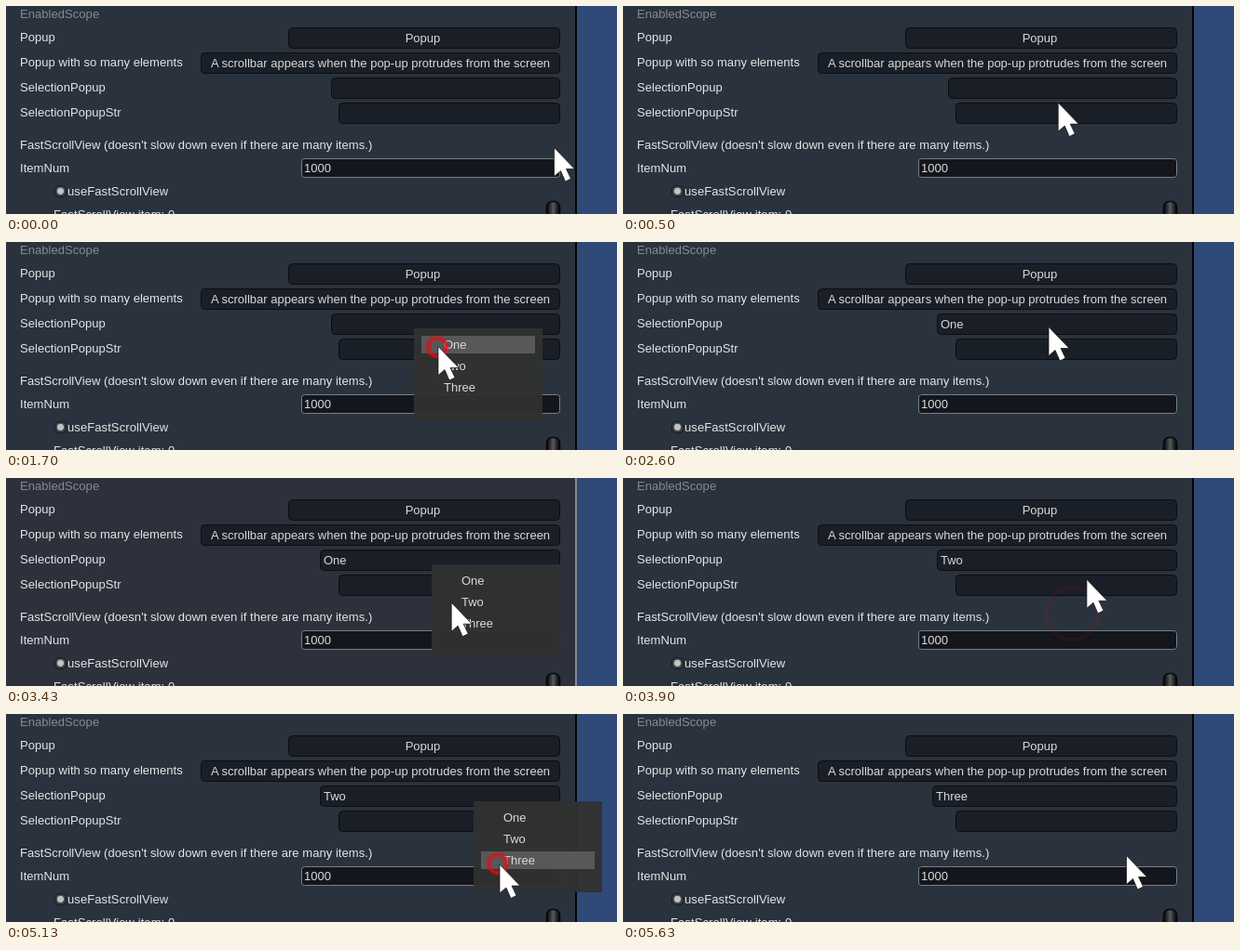
An HTML page that plays this animation: 656x224 px, repeating every 6530 ms.

```html
<!DOCTYPE html>
<html lang="en">
<head>
<meta charset="utf-8">
<title>Selection popup</title>
<style>
  html, body { margin: 0; width: 100%; height: 100%; overflow: hidden; background: #2a323d; }
  svg { display: block; width: 656px; height: 224px; }
  text { font: 13px "Liberation Sans", Arial, sans-serif; fill: #d8d9da; white-space: pre; }
  .labels text { fill: #e4e5e6; letter-spacing: .05px; }
  .labels .off { fill: #868a90; }
  .labels .toggle { letter-spacing: .09px; }
  .mid { text-anchor: middle; }
  .btn { fill: #1a1e27; stroke: #0b0d11; }
</style>
</head>
<body>
<svg viewBox="0 0 656 224">
  <defs>
    <linearGradient id="thumbFill">
      <stop offset=".1" stop-color="#111315"/>
      <stop offset=".5" stop-color="#55585c"/>
      <stop offset=".9" stop-color="#111315"/>
    </linearGradient>
    <filter id="soft" x="-50%" y="-50%" width="200%" height="200%">
      <feGaussianBlur stdDeviation=".8"/>
    </filter>
  </defs>
  <rect width="656" height="224" fill="#304a77"/>
  <rect id="panel" width="611" height="224"/>
  <rect id="edge" x="611" width="2" height="224"/>

  <g class="labels">
    <text class="off" x="15" y="13">EnabledScope</text>
    <text x="15" y="38">Popup</text>
    <text x="15" y="65">Popup with so many elements</text>
    <text x="15" y="92">SelectionPopup</text>
    <text x="15" y="119">SelectionPopupStr</text>
    <text x="15" y="154">FastScrollView (doesn't slow down even if there are many items.)</text>
    <text x="15" y="179">ItemNum</text>
    <text class="toggle" x="66" y="204">useFastScrollView</text>
    <text class="toggle" x="51" y="229">FastScrollView item: 0</text>
  </g>

  <rect class="btn" x="303.5" y="23.5" width="291" height="22" rx="4"/>
  <text class="mid" x="447.5" y="39">Popup</text>
  <rect class="btn" x="209.5" y="50.5" width="385" height="22" rx="4"/>
  <text class="mid" x="402" y="66">A scrollbar appears when the pop-up protrudes from the screen</text>
  <rect class="btn" id="choiceBox" y="77.5" height="22" rx="4"/>
  <text id="choiceText" y="93"></text>
  <rect class="btn" x="357.5" y="104.5" width="237" height="22" rx="4"/>

  <rect x="317.5" y="164.5" width="277" height="20" rx="3" fill="#13161c" stroke="#7b7e83"/>
  <text x="320" y="179">1000</text>

  <rect x="52.5" y="193.5" width="12" height="12" rx="4.5" fill="#3d4147" stroke="#14171b"/>
  <circle cx="58.5" cy="199.300" r="3.6" fill="#c0c1c3"/>
  <rect x="580.5" y="210.5" width="14" height="40" rx="6" fill="url(#thumbFill)" stroke="#060708" stroke-width="1.5"/>

  <g id="menu">
    <rect width="138" height="98" fill="#313131" fill-opacity=".95"/>
    <rect id="hover" x="8" width="122" height="19" fill="#585858"/>
    <text x="32" y="22">One</text>
    <text x="32" y="45">Two</text>
    <text x="32" y="68">Three</text>
  </g>
  <circle id="ring" fill="none" stroke="#e01018" stroke-width="3.6" filter="url(#soft)"/>
  <path id="cursor" d="M0 0V31L7 25L12 36.500L18 33.500L13 23H22Z" fill="#fff" stroke="#111" stroke-opacity=".7"/>
</svg>
<script>
const LOOP = 6530;
const el = id => document.getElementById(id);
const [panel, edge, choiceBox, choiceText, menu, hover, ring, cursor] =
  ["panel", "edge", "choiceBox", "choiceText", "menu", "hover", "ring", "cursor"].map(el);

// Pointer stops: time, x, y
const stops = [
  [0, 588.5, 152.5], [30, 588.5, 152.5], [680, 439.5, 93], [1080, 439.5, 93],
  [1370, 464, 112.5], [1960, 464, 112.5], [2560, 457, 91.5], [3200, 457, 91.5],
  [3530, 484, 146], [3680, 484, 146], [4030, 504, 93], [4500, 504, 93],
  [4930, 530, 162], [5160, 530, 162], [5630, 540.5, 152.5], [LOOP, 540.5, 152.5]
];

// Click rings: time, x, y
const clicks = [
  [880, 438, 93], [1570, 463, 113], [2730, 457, 93],
  [3530, 482, 146], [4420, 502, 93], [5000, 528, 161]
];
const RING_TIME = 400, RING_SIZE = 30;

// Each opening of the menu, with the item picked in it
const menus = [
  { open: 960, pick: 1570, close: 1760, x: 438, y: 93, item: 0 },
  { open: 2830, pick: 3530, close: 3680, x: 457, y: 93, item: 1 },
  { open: 4510, pick: 5000, close: 5160, x: 502, y: 94, item: 2 }
];
const choices = [["One", 337], ["Two", 337], ["Three", 332]];

function set(node, attrs) {
  for (const key in attrs) node.setAttribute(key, attrs[key]);
}

function show(node, on) {
  node.setAttribute("visibility", on ? "inherit" : "hidden");
}

function pointerAt(t) {
  const i = Math.max(1, stops.findIndex(s => s[0] > t));
  const [t0, x0, y0] = stops[i - 1], [t1, x1, y1] = stops[i];
  const u = (t - t0) / (t1 - t0), e = u * u * (3 - 2 * u);
  return [x0 + (x1 - x0) * e, y0 + (y1 - y0) * e];
}

function drawMenu(t) {
  const m = menus.find(m => t >= m.open && t < m.close);
  const away = m && t < m.pick;
  set(panel, { fill: away ? "#2d313b" : "#2a323d" });
  set(edge, { fill: away ? "#858a92" : "#030405" });
  menu.setAttribute("visibility", m ? "visible" : "hidden");
  if (!m) return;
  set(menu, { transform: `translate(${m.x} ${m.y})` });
  set(hover, { y: 8 + 23 * m.item });
  show(hover, !away);
}

function drawChoice(t) {
  const done = menus.filter(m => t >= m.close).pop();
  const [label, left] = done ? choices[done.item] : ["", 349];
  set(choiceBox, { x: left + 0.5, width: 594 - left });
  set(choiceText, { x: left + 4 });
  choiceText.textContent = label;
}

function drawRing(t) {
  const c = clicks.find(c => t >= c[0] && t < c[0] + RING_TIME);
  show(ring, c);
  if (!c) return;
  const u = (t - c[0]) / RING_TIME;
  set(ring, { cx: c[1], cy: c[2], r: RING_SIZE * u, opacity: Math.min(1, 1.4 * (1 - u)) });
}

function draw(t) {
  drawMenu(t);
  drawChoice(t);
  drawRing(t);
  const [x, y] = pointerAt(t);
  set(cursor, { transform: `translate(${x.toFixed(1)} ${y.toFixed(1)})` });
}

const start = performance.now();
function tick() {
  draw((performance.now() - start) % LOOP);
  requestAnimationFrame(tick);
}
tick();
</script>
</body>
</html>
```
